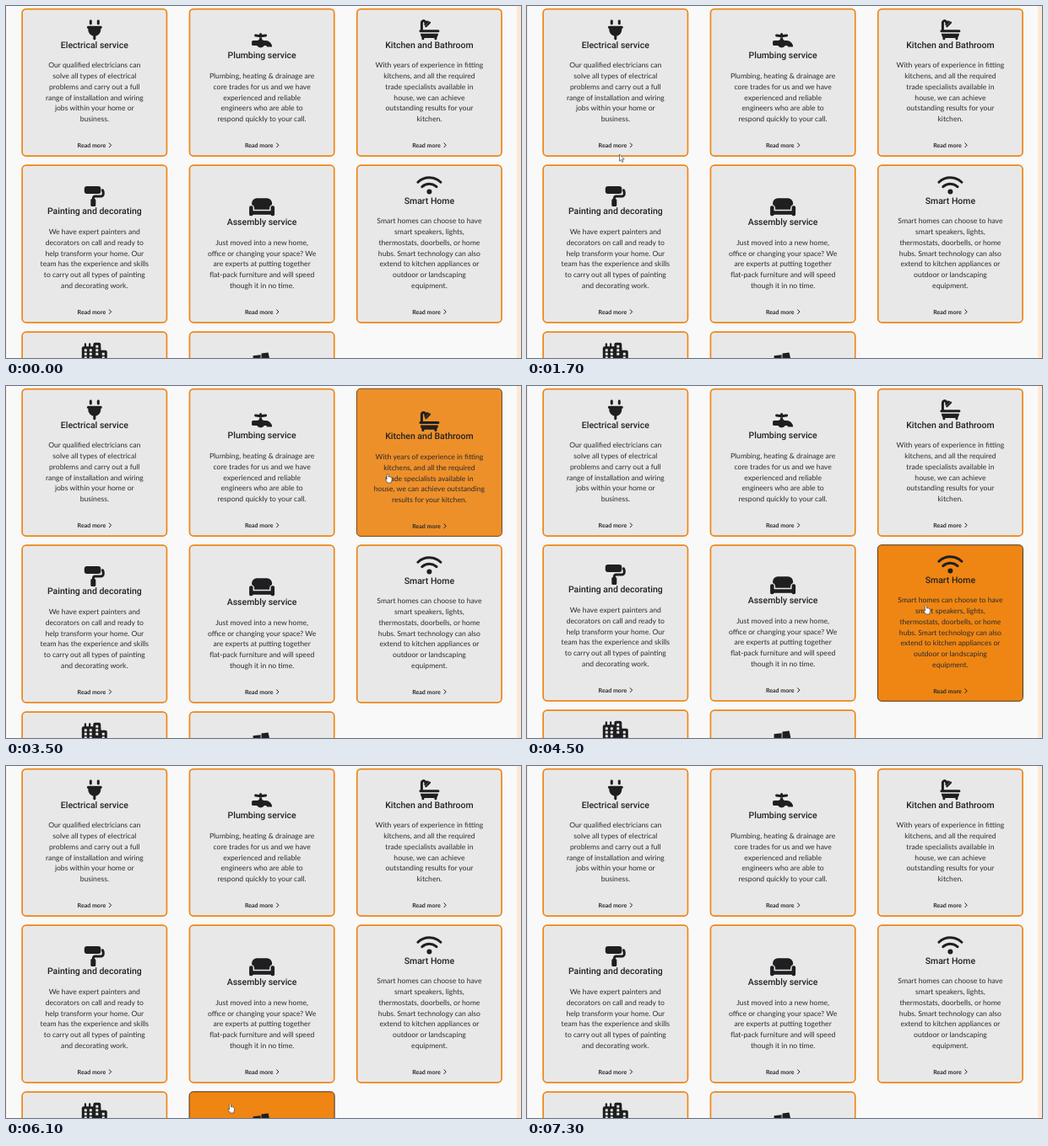
These frames come from a looping animation (610x418 px, 8300 ms). An HTML page:

```html
<!DOCTYPE html>
<html lang="en">
<head>
<meta charset="utf-8">
<title>Service cards</title>
<style>
html, body { margin: 0; width: 100%; height: 100%; overflow: hidden; background: #f9f9f9; }
svg { display: block; width: 610px; height: 418px; }
text { fill: #2b2b2b; text-rendering: geometricPrecision; }
.title { font: 500 10.5px Roboto, sans-serif; fill: #222; text-anchor: middle; }
.body { font: 400 8.62px Lato, sans-serif; text-anchor: middle; }
.more { font: 700 7.05px Lato, sans-serif; }
.icon { fill: #1f1f21; }
.line { fill: none; stroke: #1f1f21; stroke-linejoin: round; }
.pointer { fill: #fff; stroke: #444; stroke-width: .7; stroke-linejoin: round; }
</style>
</head>
<body>
<svg viewBox="0 0 610 418">
  <rect width="610" height="418" fill="#f9f9f9"/>
  <rect width="1" height="418" fill="#fdebd8"/>
  <rect x="605" width="5" height="418" fill="#fde8d3"/>
  <g id="cards"></g>
  <path id="arrow" class="pointer" d="M0 0V8.2L1.9 6.5 3.2 9.4 4.5 8.8 3.2 6H5.7Z"/>
  <path id="hand" class="pointer" d="M-1 1Q0-.6 1 1V4Q3 3 3.8 4.5 5 4.3 5 5.5V8L4 11H0L-2.8 7Q-3 6-1 7Z"/>
</svg>
<script>
const LOOP = 8300, STEP = 100, FADE = 300;
const WIDTH = 173, PITCH = 198.3, LINE = 12.83, UNIT = 1.5;
const ROWS = [[2.7, 178.9], [188.3, 376.7], [386.3, 562]];
const GREY = [232, 232, 232], ORANGE = [239, 133, 18], EDGE = [238, 134, 23], DARK = [73, 50, 28];

const fill = d => `<path class="icon" d="${d}"/>`;
const line = (d, w = 2, cap = "round") =>
  `<path class="line" d="${d}" stroke-width="${w}" stroke-linecap="${cap}"/>`;
const box = (x, y, w, h, r = 0) =>
  `<rect class="icon" x="${x}" y="${y}" width="${w}" height="${h}" rx="${r}"/>`;
const dot = (x, y, r) => `<circle class="icon" cx="${x}" cy="${y}" r="${r}"/>`;
const panes = (x, y) => [0, 3, 6].map(dy =>
  `<rect x="${x}" y="${y + dy}" width="2" height="2" rx=".4" fill="currentColor"/>`).join("");

// Icons are 16 units high; w is their width.
const ICONS = {
  plug: { w: 12, art: line("M3 1V3M9 1V3M1 6H11M6 12V15") + fill("M1 6H11V8A5 5 0 0 1 1 8Z") },
  tap: { w: 16, art: line("M3 4L7 4.5 11 4M7 3V4") + box(6, 5.6, 2, 3) + box(0, 8, 11, 4, 1) +
    dot(7, 10.3, 3.3) + line("M10 10H11A3 3 0 0 1 14 13", 4, "butt") },
  bath: { w: 16, art: line("M2 8V2.4A1.4 1.4 0 0 1 4.4 1.4L5 2M1 9H15M3 13V15M13 13V15") +
    line("M5.3 5.4L8.4 2.3", 1.5) + fill("M4.5 5A2.5 2.5 0 0 1 8 1.5Z") +
    fill("M1 11H15Q15 14.5 11.5 14.5H4.5Q1 14.5 1 11Z") },
  roller: { w: 16, art: box(0, 0, 13, 6, 2) + box(5, 10, 4, 6, 1) +
    line("M14.4 3.2Q15 4 15 6A2 2 0 0 1 13 8H8.5Q7 8 7 10") },
  couch: { w: 20, art: fill("M2 5A4 4 0 0 1 6 1H14A4 4 0 0 1 18 5V6Q16 7 16 8.5V10H4V8.5Q4 7 2 6Z") +
    box(0, 7, 3, 8, 1.2) + box(17, 7, 3, 8, 1.2) + box(2, 11, 16, 3) },
  wifi: { w: 20, art: line("M1 5.4A13 13 0 0 1 19 5.4M4.3 9A8.4 8.4 0 0 1 15.7 9") + dot(10, 13, 2) },
  city: { w: 20, art: line("M2.75 1V4M6.25 1V4", 1.5) + box(0, 3, 15, 13, 1.5) + box(9, 0, 6, 16, 1.5) +
    box(12, 6, 8, 10, 1.5) + panes(2, 5) + panes(6, 5) + panes(11, 2) + panes(16, 8) },
  boxes: { w: 16, art: fill("M1 2.5L7 1.8V16H1Z") + fill("M7.6 .6L13 0 14 4.5V16H7.6Z") }
};

// "wide" is the wrapping under the pointer, where a thinner border leaves more room.
const CARDS = [
  { icon: "plug", title: "Electrical service",
    text: "Our qualified electricians can|solve all types of electrical|problems and carry out a full|range of installation and wiring|jobs within your home or|business.",
    wide: "Our qualified electricians can|solve all types of electrical|problems and carry out a full|range of installation and wiring|jobs within your home or business." },
  { icon: "tap", title: "Plumbing service",
    text: "Plumbing, heating &amp; drainage are|core trades for us and we have|experienced and reliable|engineers who are able to|respond quickly to your call.",
    wide: "Plumbing, heating &amp; drainage are|core trades for us and we have|experienced and reliable|engineers who are able to respond|quickly to your call." },
  { icon: "bath", title: "Kitchen and Bathroom",
    text: "With years of experience in fitting|kitchens, and all the required|trade specialists available in|house, we can achieve|outstanding results for your|kitchen.",
    wide: "With years of experience in fitting|kitchens, and all the required|trade specialists available in|house, we can achieve outstanding|results for your kitchen." },
  { icon: "roller", title: "Painting and decorating",
    text: "We have expert painters and|decorators on call and ready to|help transform your home. Our|team has the experience and skills|to carry out all types of painting|and decorating work." },
  { icon: "couch", title: "Assembly service",
    text: "Just moved into a new home,|office or changing your space? We|are experts at putting together|flat-pack furniture and will speed|though it in no time." },
  { icon: "wifi", title: "Smart Home",
    text: "Smart homes can choose to have|smart speakers, lights,|thermostats, doorbells, or home|hubs. Smart technology can also|extend to kitchen appliances or|outdoor or landscaping|equipment." },
  { icon: "city", top: 399.8 },
  { icon: "boxes", top: 411.5 }
];

// Stops of the pointer: time, x, y.
const STOPS = [[1200, 203, 425], [1500, 203, 186], [1700, 109.5, 176], [2100, 106, 110],
  [2400, 189, 116], [2580, 219, 118], [2700, 267.5, 120], [3310, 418, 104], [3500, 452, 104],
  [3700, 470, 112], [3900, 470, 112], [4500, 472.5, 260], [5100, 104, 285], [5400, 104, 402],
  [5800, 265.5, 401], [6500, 265.5, 401], [7200, 620, 400]];

const $ = id => document.getElementById(id);
const ease = p => 1 - Math.pow(1 - Math.min(1, Math.max(0, p)), 2.2);
const mix = (a, b, p) => `rgb(${a.map((v, i) => Math.round(v + (b[i] - v) * p))})`;
const rowOf = i => Math.floor(i / 3);
const leftOf = i => 18.3 + PITCH * (i % 3);

function set(node, attrs) {
  for (const k in attrs) node.setAttribute(k, attrs[k]);
}

function pointer(t) {
  const i = STOPS.findIndex(s => s[0] > t);
  if (i < 1) return null;
  const [t0, x0, y0] = STOPS[i - 1], [t1, x1, y1] = STOPS[i];
  const p = (t - t0) / (t1 - t0);
  return [x0 + (x1 - x0) * p, y0 + (y1 - y0) * p];
}

function cardAt(t, inset = 3) {
  const at = pointer(t);
  return at ? CARDS.findIndex((_, i) => {
    const [top, bottom] = ROWS[rowOf(i)], x = at[0] - leftOf(i);
    return x > inset && x < WIDTH - inset && at[1] > top + inset && at[1] < bottom - inset;
  }) : -1;
}

// When the pointer enters and leaves each card.
const spans = CARDS.map(() => [LOOP, LOOP]);
for (let t = 0; t < LOOP; t += 10) {
  const span = spans[cardAt(t)];
  if (span) span.splice(0, 2, Math.min(span[0], t), t + 10);
}

// Card content, measured upwards from the bottom edge of the card.
function content(card, text, bottom) {
  const { w, art } = ICONS[card.icon];
  let out = "", top = card.top - bottom;
  if (text) {
    const lines = text.split("|");
    const first = -41.7 - (lines.length - 1) * LINE;
    top = first - 56.9;
    out = `<text class="title" y="${first - 23.4}">${card.title}</text>` +
      lines.map((s, i) => `<text class="body" y="${first + i * LINE}">${s}</text>`).join("") +
      `<text class="more" x="-20.2" y="-11.2">Read more</text>` +
      line("M17.5-16l2.3 2.4-2.3 2.4", 1);
  }
  return `<g><g transform="translate(${-w * UNIT / 2} ${top}) scale(${UNIT})">${art}</g>${out}</g>`;
}

$("cards").innerHTML = CARDS.map((card, i) => {
  const bottom = ROWS[rowOf(i)][1];
  return `<g><rect rx="4.6"/>${content(card, card.text, bottom)}${content(card, card.wide || card.text, bottom)}</g>`;
}).join("");
const nodes = [...$("cards").children].map(g => [...g.children]);

function draw(t) {
  const active = spans.findIndex(s => t >= s[0] && t < s[1]);
  // The tallest card sets the height of the second row.
  const shrink = active === 5 ? 2 : 0;
  nodes.forEach(([rect, plain, wide], i) => {
    const row = rowOf(i), on = i === active, [t0, t1] = spans[i];
    const tint = ease((Math.min(t, t1) - t0) / FADE) * (1 - ease((t - t1) / FADE));
    const color = mix(GREY, ORANGE, tint);
    const left = leftOf(i), weight = on ? 1 : 1.7;
    const top = ROWS[row][0] - (row > 1 ? shrink : 0);
    const bottom = ROWS[row][1] - (row > 0 ? shrink : 0);
    set(rect, {
      x: left + weight / 2, y: top + weight / 2, width: WIDTH - weight, height: bottom - top - weight,
      fill: color, stroke: mix(EDGE, DARK, on ? tint * tint : 0), "stroke-width": weight
    });
    const transform = `translate(${left + WIDTH / 2} ${bottom + (on ? 1 : 0)})`;
    set(plain, { transform, color, display: on ? "none" : "inline" });
    set(wide, { transform, color, display: on ? "inline" : "none" });
  });
  const at = pointer(t);
  const show = (id, on) =>
    set($(id), { display: at && on ? "inline" : "none", transform: `translate(${at || [0, 0]})` });
  show("arrow", active < 0);
  show("hand", active >= 0);
}

const start = performance.now();
function tick() {
  const t = (performance.now() - start) % LOOP;
  draw(Math.floor(t / STEP) * STEP);
  requestAnimationFrame(tick);
}
tick();
</script>
</body>
</html>
```
